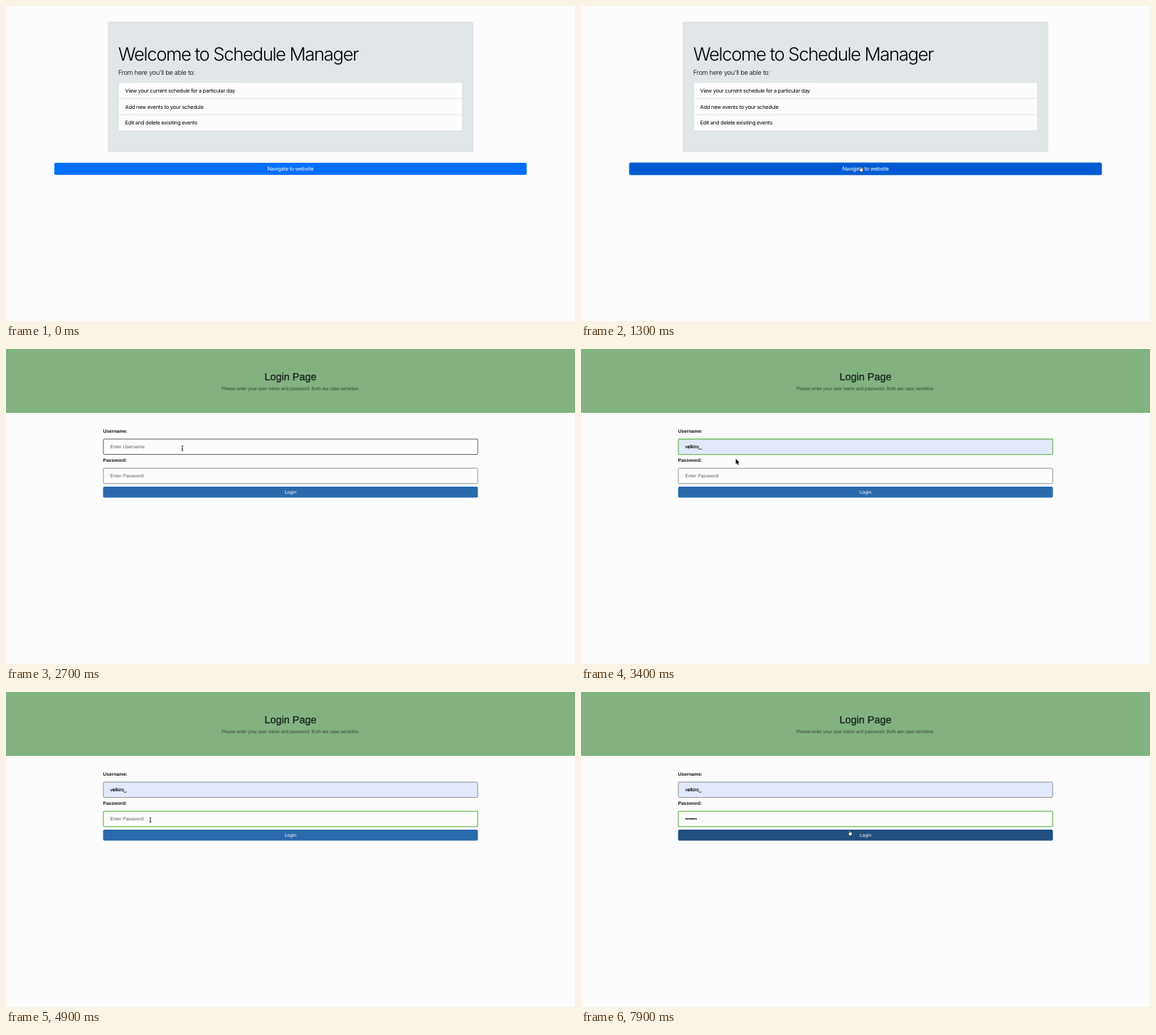
Animation, 800 px wide and 444 px high, one loop 8000 ms. Source, as an HTML page:

```html
<!DOCTYPE html>
<html lang="en">
<head>
<meta charset="utf-8">
<title>Schedule Manager</title>
<style>
  html, body { margin: 0; width: 100%; height: 100%; overflow: hidden; background: #fcfcfc; }
  svg { display: block; width: 800px; height: 444px; text-rendering: geometricPrecision; }
  text { white-space: pre; }
  .mid { text-anchor: middle; }
  .white { fill: #fff; }

  #welcome { font: 400 7.4px Inter, sans-serif; font-optical-sizing: none; letter-spacing: -.028em; }
  #welcome .title { font-size: 25.7px; font-weight: 300; letter-spacing: -.0525em; }
  #welcome .lead { font-size: 9.2px; font-weight: 300; letter-spacing: -.032em; }
  .panel { fill: #e1e6e8; }
  .list { fill: #fcfcfc; stroke: #cfd4d6; stroke-width: .6; }
  #go { fill: #006fff; }
  #go.hover { fill: #005bd3; }
  #go.focus { stroke: #80b5f5; stroke-width: 1.5; paint-order: stroke; }

  #login { font: 400 6.65px "Liberation Sans", Arial, sans-serif; }
  #login .title { font-size: 14.4px; fill: #1d2522; stroke: #1d2522; stroke-width: .35; }
  #login .lead { fill: #1d2522; fill-opacity: .72; letter-spacing: -.02em; }
  .label { font-weight: 700; fill: #111; }
  .hint { fill: #5c5c5c; }
  .value { fill: #000; stroke: #000; stroke-width: .15; }
  .field { fill: #fcfcfc; stroke: #8a8a8a; stroke-width: .9; }
  .field.hover { stroke: #4c4c4c; }
  .field.filled { fill: #e1e9fb; }
  .field.focus { stroke: #74bb5b; stroke-width: 1.3; }
  #submit { fill: #2a6aac; }
  #submit.hover { fill: #204f80; }
  #caret { fill: #000; }
  #arrow { fill: #000; stroke: #fff; stroke-width: .7; paint-order: stroke; }
  #hand { fill: #fff; stroke: #000; stroke-width: .6; stroke-linejoin: round; }
  #beam { fill: none; stroke: #111; stroke-width: .75; }
</style>
</head>
<body>
<svg viewBox="0 0 800 444">
  <g id="welcome">
    <rect class="panel" x="143" y="22" width="514" height="184" rx="2.5"/>
    <text class="title" x="157.8" y="77">Welcome to Schedule Manager</text>
    <text class="lead" x="157.8" y="96.8">From here you'll be able to:</text>
    <rect class="list" x="158.2" y="107.7" width="483.6" height="68.3" rx="2"/>
    <path class="list" d="M158.2 130.4H641.8M158.2 153.2H641.8"/>
    <text x="167.6" y="121.9">View your current schedule for a particular day</text>
    <text x="167.6" y="144.7">Add new events to your schedule</text>
    <text x="167.6" y="167.4">Edit and delete exisiting events</text>
    <rect id="go" x="68" y="221" width="664" height="17" rx="2"/>
    <text class="mid white" x="400" y="232.3">Navigate to website</text>
  </g>

  <g id="login">
    <rect width="800" height="90" fill="#82b282"/>
    <text class="title mid" x="400" y="44.2">Login Page</text>
    <text class="lead mid" x="400" y="58.4">Please enter your user name and password. Both are case sensitive.</text>
    <text class="label" x="136.5" y="118.3">Username:</text>
    <rect id="user" class="field" x="136.9" y="127" width="526.3" height="21.6" rx="1.2"/>
    <text id="userHint" class="hint" x="146.5" y="140.1">Enter Username</text>
    <text id="userText" class="value" x="146.5" y="140.1">velkiro_</text>
    <text class="label" x="136.5" y="159.4">Password:</text>
    <rect id="pass" class="field" x="136.9" y="168.1" width="526.3" height="21.6" rx="1.2"/>
    <text id="passHint" class="hint" x="146.5" y="181.2">Enter Password</text>
    <text id="passText" class="value" x="146.5" y="181.2"></text>
    <rect id="submit" x="136.5" y="194" width="527" height="15.5" rx="2"/>
    <text class="mid white" x="400" y="204.1">Login</text>
    <rect id="caret" width=".7" height="7.6"/>
  </g>

  <g id="cursor">
    <path id="arrow" d="M0 0V7.5L1.7 6 2.9 8.7 4.1 8.1 3 5.5H5.3Z"/>
    <path id="hand" d="M-.7 .6Q0-.4 .7 .6V3Q3.5 2.9 3.7 4.3L3.4 6.4 2.8 7.9H-.2L-1.9 5.4Q-2.2 4.3-.7 4.8Z"/>
    <path id="beam" d="M-1.4-3.5Q0-3.5 0-2.7V2.7Q0 3.5-1.4 3.5M1.4-3.5Q0-3.5 0-2.7M0 2.7Q0 3.5 1.4 3.5M-.9 .9H.9"/>
  </g>
</svg>
<script>
  const LOOP = 8000, TICK = 100;
  const el = {};
  document.querySelectorAll('[id]').forEach(e => el[e.id] = e);

  // Pointer waypoints: time, x, y
  const path = [
    [300, 440, 31], [1000, 393, 226], [2000, 393, 225.5], [2700, 248, 140],
    [2900, 248, 140], [3700, 203.6, 161.5], [3800, 203.6, 161.5], [4100, 200, 178],
    [4800, 200, 178], [5000, 206, 183], [7000, 206, 183], [7800, 376, 192], [7900, 377.5, 194.6]
  ];
  const keys = [5400, 5800, 6000, 6400, 6600, 6800, 7000];
  const LOAD = 1400, USER = 2800, FILL = 3400, PICK = 3800, PASS = 4300;

  const show = (e, on) => e.setAttribute('visibility', on ? 'inherit' : 'hidden');
  const flag = (e, name, on) => e.classList.toggle(name, on);
  const ease = p => p * p * (3 - 2 * p);

  function pointer(t) {
    let i = 0;
    while (i < path.length - 1 && path[i + 1][0] <= t) i++;
    const a = path[i], b = path[i + 1] || a;
    const p = b === a ? 0 : ease(Math.max(0, (t - a[0]) / (b[0] - a[0])));
    return [a[1] + (b[1] - a[1]) * p, a[2] + (b[2] - a[2]) * p];
  }

  function render(t) {
    const [x, y] = pointer(t);
    const seen = t >= 300 && t < 5100 || t >= 7000;
    const onLogin = t >= LOAD;
    const over = e => {
      const b = e.getBBox();
      return seen && x >= b.x && x <= b.x + b.width && y >= b.y && y <= b.y + b.height;
    };

    show(el.welcome, !onLogin);
    show(el.login, onLogin);

    const goHover = !onLogin && over(el.go);
    flag(el.go, 'hover', goHover);
    flag(el.go, 'focus', t >= 1200);

    const inUser = onLogin && over(el.user), inPass = onLogin && over(el.pass);
    const onSubmit = onLogin && over(el.submit);
    const filled = t >= FILL;
    flag(el.user, 'hover', inUser);
    flag(el.pass, 'hover', inPass);
    flag(el.user, 'focus', t >= USER && t < PASS);
    flag(el.pass, 'focus', t >= PASS);
    flag(el.user, 'filled', filled);
    flag(el.submit, 'hover', onSubmit);
    show(el.userHint, !filled);
    show(el.userText, filled);

    const typed = keys.filter(k => k <= t).length;
    el.passText.textContent = '•'.repeat(typed);
    show(el.passHint, !typed);

    // The caret restarts its blink at every focus or key press
    const since = t - Math.max(...[USER, PICK, PASS, ...keys].filter(k => k <= t));
    const inFirst = t < PASS;
    show(el.caret, t >= USER && since % 1000 < 500 && !(filled && t < PICK));
    el.caret.setAttribute('x', inFirst ? (filled ? 169.2 : 146.5) : 146.5 + typed * 2.3);
    el.caret.setAttribute('y', inFirst ? 133.8 : 174.9);

    const kind = goHover || onSubmit ? 'hand' : inUser || inPass ? 'beam' : 'arrow';
    for (const k of ['arrow', 'hand', 'beam']) show(el[k], k === kind);
    show(el.cursor, seen);
    el.cursor.setAttribute('transform', `translate(${x} ${y})`);
  }

  function loop() {
    const t = performance.now() % LOOP;
    render(Math.floor(t / TICK) * TICK);
    requestAnimationFrame(loop);
  }
  loop();
</script>
</body>
</html>
```
